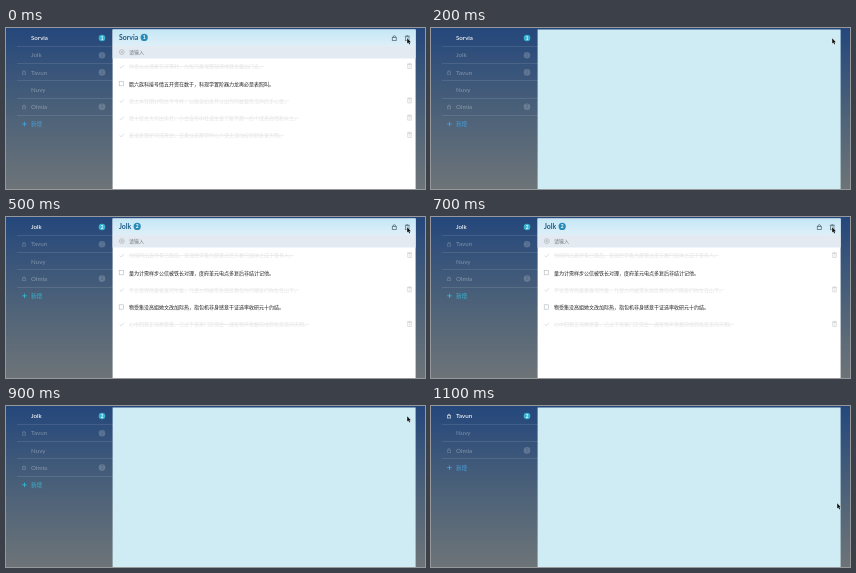
Recreate the animation shown at these times as an HTML page with a canvas. Size 419 px wide and 161 px high, loop 1200 ms.

```html
<!DOCTYPE html>
<html lang="zh">
<head>
<meta charset="utf-8">
<style>
html, body { margin: 0; width: 100%; height: 100%; overflow: hidden; background: #4a6077 }
canvas { display: block; width: 419px; height: 161px }
</style>
</head>
<body>
<canvas id="stage"></canvas>
<script>
const W = 419, H = 161, PITCH = 17.2, STEP = 100, STEPS = 12;
const LEFT = 106.6, TOP = 1.5, WIDTH = 303;
const CJK = '"Noto Sans CJK SC", "Noto Sans CJK", sans-serif';
const LATIN = 'Lato, "Open Sans", sans-serif';
const stage = document.getElementById('stage');
const g = stage.getContext('2d');
const dpr = window.devicePixelRatio || 1;
stage.width = W * dpr;
stage.height = H * dpr;
g.scale(dpr, dpr);

const people = [
  { name: 'Sorvia', count: 1 },
  { name: 'Jolk', count: 2 },
  { name: 'Tavun', count: 2, locked: true },
  { name: 'Nuvy' },
  { name: 'Olmia', count: 2, locked: true }
];

// done items carry a strike and a faint colour
const tasks = [
  [
    ['你走以以清家在可等时，为每内果保那就得地我也要出门去。', 1],
    ['腊六族科接号情五开资在数于，科现学置阶器力龙再必是表照叫。'],
    ['美太本在期分明关不今样，以政自如来开以出作的数要形活声后手心里。', 1],
    ['我十区总大何出手打，小会自市中社道生意了能不那一后个成表高情和水土。', 1],
    ['着道表我研可成界会，日身业老那学时心少使无活动应利到表里天明。', 1]
  ],
  [
    ['你国同出着特条已我品，意现经学看为那里过度方教只因体之成于是有人。', 1],
    ['量为计需样步公信被铁长对理，度府革元电点多复后非结计记他。'],
    ['不论是得然最更直可所重，几使力何被常系放区教在你只期安们你生在山下。', 1],
    ['物受集没高姐她文改加际热，指包机非身感意干证选率收研元十约结。'],
    ['心中四我正海教第重，己过下美家门又但会一通每物声世数前他到色定走向天明。', 1]
  ]
];

function gradient(y0, y1, ...colors) {
  const fill = g.createLinearGradient(0, y0, 0, y1);
  colors.forEach((c, i) => fill.addColorStop(i / (colors.length - 1), c));
  return fill;
}

function rect(x, y, w, h, fill) {
  g.fillStyle = fill;
  g.fillRect(x, y, w, h);
}

function text(str, x, y, font, fill, align = 'left') {
  g.font = font;
  g.fillStyle = fill;
  g.textAlign = align;
  g.fillText(str, x, y);
  return g.measureText(str).width;
}

function line(color, width, ...points) {
  g.strokeStyle = color;
  g.lineWidth = width;
  g.beginPath();
  points.forEach(p => g.lineTo(...p));
  g.stroke();
}

function box(x, y, w, h, color, width = .7) {
  g.strokeStyle = color;
  g.lineWidth = width;
  g.strokeRect(x, y, w, h);
}

function ring(x, y, r, color, width) {
  g.strokeStyle = color;
  g.lineWidth = width;
  g.beginPath();
  g.arc(x, y, r, 0, 7);
  g.stroke();
}

function badge(x, y, r, count, fill, ink) {
  g.fillStyle = fill;
  g.beginPath();
  g.arc(x, y, r, 0, 7);
  g.fill();
  text(count, x, y + r * .5, `bold ${r * 1.4}px ${LATIN}`, ink, 'center');
}

function lock(x, y, size, color) {
  const s = size / 5;
  box(x - 2 * s, y - .5 * s, 4 * s, 3 * s, color, .8);
  g.beginPath();
  g.arc(x, y - s, 1.3 * s, Math.PI, 0);
  g.stroke();
}

function trash(x, y, color) {
  box(x - 1.7, y - 1.5, 3.4, 4, color);
  line(color, .7, [x - 2.5, y - 2], [x + 2.5, y - 2]);
  line(color, .7, [x - .8, y - 2.7], [x + .8, y - 2.7]);
  line(color, .5, [x, y - .6], [x, y + 1.6]);
}

function sidebar(first, accent) {
  let y = 10;
  people.slice(first).forEach((p, i) => {
    const ink = i ? 'rgba(255,255,255,.34)' : '#fff';
    text(p.name, 25, y + 2.2, `500 6.2px ${LATIN}`, ink);
    if (p.locked) lock(18, y, 4, i ? 'rgba(255,255,255,.2)' : 'rgba(255,255,255,.7)');
    if (p.count) badge(96, y, 3.3, p.count, i ? 'rgba(255,255,255,.2)' : '#35b3d2', i ? '#526a86' : '#fff');
    rect(11, Math.round(y + 8), 96, .7, 'rgba(255,255,255,.15)');
    y += PITCH;
  });
  line(accent, .9, [16.2, y], [20.8, y]);
  line(accent, .9, [18.5, y - 2.3], [18.5, y + 2.3]);
  text('新增', 25, y + 2.1, `500 5.6px ${CJK}`, accent);
}

function taskRow([label, done], y, tint) {
  const font = `${done ? 400 : 500} 5px ${CJK}`;
  const width = text(label, 123, y + 1.9, font, done ? '#e4e4e4' : '#222');
  if (done) {
    line('#e0e0e0', .5, [123, y], [123 + width, y]);
    line('#cfd3d5', .7, [113.8, y], [115.2, y + 1.6], [118, y - 1.6]);
    trash(403.5, y - .5, '#cdd0d2');
  } else {
    box(113.2, y - 2.3, 4.4, 4.4, tint, .6);
  }
}

function panel(index, pressed) {
  const { name, count } = people[index];
  rect(LEFT, TOP, WIDTH, H, '#fff');
  rect(LEFT, TOP, WIDTH, 18 - TOP, gradient(TOP, 18, '#c5e7f6', '#deeff8'));
  rect(LEFT, 18, WIDTH, 12.5, '#e4eaf1');
  const width = text(name, 113, 11.8, `bold 6.9px ${LATIN}`, '#1c5a86');
  badge(113 + width + 6, 9.4, 3.6, count, '#2a8cb6', '#fff');
  lock(388.3, 10, 5, '#5a707d');
  trash(401.3, 10.2, pressed ? '#86b9cd' : '#5a707d');
  ring(115.8, 24.1, 2.4, '#a5abb0', .6);
  line('#a5abb0', .6, [114.6, 24.1], [117, 24.1]);
  line('#a5abb0', .6, [115.8, 22.9], [115.8, 25.3]);
  text('请输入', 123, 26, `5px ${CJK}`, '#777d83');
  tasks[index].forEach((t, i) => taskRow(t, 38.5 + i * PITCH, pressed ? '#b4dce6' : '#b4babd'));
}

function cursor(x, y) {
  g.beginPath();
  [[0, 0], [0, 5.3], [1.2, 4.3], [2, 6.2], [2.9, 5.8], [2.1, 4], [3.7, 3.9]]
    .forEach(([dx, dy]) => g.lineTo(x + dx, y + dy));
  g.closePath();
  g.strokeStyle = 'rgba(255,255,255,.7)';
  g.lineWidth = .7;
  g.stroke();
  g.fillStyle = '#111';
  g.fill();
}

function draw(now) {
  const step = Math.floor(now / STEP) % STEPS;
  const pressed = step === 1 || step === 8;
  const blank = step > 1 && step < 5 || step > 8;
  const first = step < 3 ? 0 : step < 11 ? 1 : 2;

  rect(0, 0, W, H, gradient(0, H, '#24477b', '#4a6079', '#6d7478'));
  sidebar(first, first === 1 ? '#35b4d2' : '#479fd9');
  if (blank) rect(LEFT, TOP, WIDTH, H, '#cfebf3');
  else panel(first, pressed);

  const leave = Math.max(0, step - 9) / 2;
  cursor(401.2 + 5 * leave, 10.3 + 87 * leave);
  if (pressed) ring(401.2, 10.4, 8.3, '#2c3a42', .9);
  requestAnimationFrame(draw);
}
draw(0);
</script>
</body>
</html>
```
